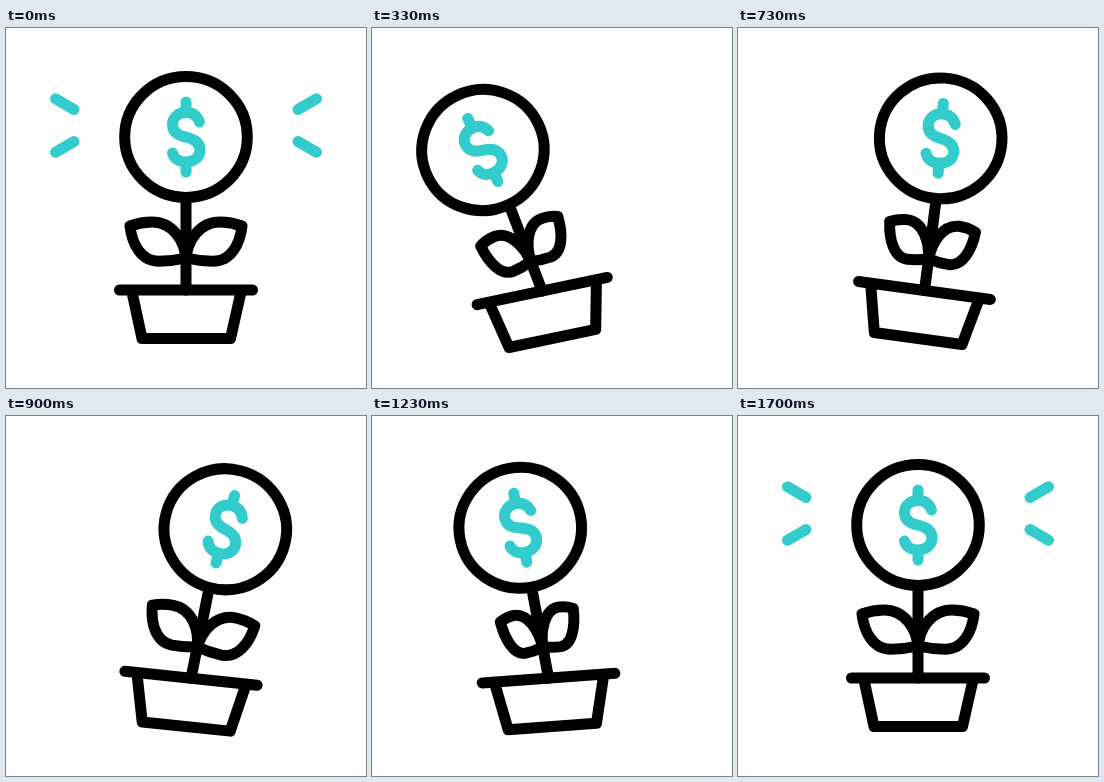
Write an HTML page that moves like this. It is 360 px wide and 360 px high and loops after 2000 ms.

```html
<!DOCTYPE html>
<html lang="en">
<head>
<meta charset="utf-8">
<title>Money plant</title>
<style>
  html, body { margin: 0; width: 100%; height: 100%; overflow: hidden; background: #fff; }
  svg { display: block; width: 100vw; height: 100vh; }
  path, ellipse { fill: none; stroke: #000; stroke-width: 11; stroke-linecap: round; stroke-linejoin: round; }
  .accent { stroke: #33cccc; }
  #leaves path { vector-effect: non-scaling-stroke; }
</style>
</head>
<body>
<svg viewBox="0 0 360 360">
  <defs>
    <path id="leaf" d="M0 0C-1 -20 -14 -38 -34 -38Q-45 -38 -56 -34C-54 -16 -45 1.3 -27 1.3Q-13 1 0 -2"/>
  </defs>
  <path id="rays" class="accent"/>
  <!-- Each part hangs on the one below it and is drawn upright around its own pivot. -->
  <path id="pot" d="M-66.5 -48H66.5M-54 -46L-44 .5H44.5L55 -46"/>
  <g id="stem">
    <path d="M0 0V-92"/>
    <g id="leaves">
      <path d="M0 0C-1 -20 -14 -38 -34 -38Q-45 -38 -56 -34C-54 -16 -45 1.3 -27 1.3Q-13 1 0 -2"/>
      <path transform="scale(-1 1)" d="M0 0C-1 -20 -14 -38 -34 -38Q-45 -38 -56 -34C-54 -16 -45 1.3 -27 1.3Q-13 1 0 -2"/>
    </g>
  </g>
  <g id="head">
    <ellipse cy="-61" rx="61.3" ry="60.4"/>
    <path class="accent" transform="translate(0 -61)" d="M0 -35V-25M0 25V35M13.5 -15C11 -22 6 -24.5 0 -24.5C-8 -24.5 -13.5 -19 -13.5 -12.5C-13.5 -5.5 -8 -1.5 0 .2C8 2 14 6 14 13C14 20 8 25 0 25C-7 25 -12 21.5 -13.5 16"/>
  </g>
</svg>
<script>
const LOOP = 2000, FRAME = 1000 / 30;
const RIM_HEIGHT = 48, STEM_LENGTH = 92, LEAF_HEIGHT = 30;

const [rays, pot, stem, leaves, head] =
  ["rays", "pot", "stem", "leaves", "head"].map(id => document.getElementById(id));

const mix = (a, b, p) => a + (b - a) * p;

// Eases from 0 to 1 between two times.
function ramp(t, from, to) {
  const p = Math.min(1, Math.max(0, (t - from) / (to - from)));
  return p * p * (3 - 2 * p);
}

const pulse = (t, from, peak, to) => ramp(t, from, peak) - ramp(t, peak, to);

// Swings left, right, left, then settles; turns after the first follow a fixed beat.
function swing(t, first, beat, left, right, leftAgain) {
  const turn = n => first + n * beat;
  return -left * pulse(t, 0, first, turn(1))
    + right * pulse(t, first, turn(1), turn(2))
    - leftAgain * pulse(t, turn(1), turn(2), turn(3));
}

// Moves up from a point along a direction tilted from vertical.
function rise({ x, y }, length, deg) {
  const a = deg * Math.PI / 180;
  return { x: x + length * Math.sin(a), y: y - length * Math.cos(a) };
}

function place(part, { x, y }, deg) {
  part.setAttribute("transform", `translate(${x} ${y}) rotate(${deg})`);
}

function rayPath(grow) {
  if (grow < 0.01) return "";
  let d = "";
  for (const side of [-1, 1])
    for (const up of [-1, 1])
      d += `M${180 + side * 112} ${97.5 + up * 16}L${180 + side * mix(112, 130.5, grow)} ${97.5 + up * mix(16, 26.7, grow)}`;
  return d;
}

function render(t) {
  const potTilt = swing(t, 428, 360, 13.5, 9.2, 4.8);
  const stemTilt = swing(t, 480, 345, 27, 14.5, 11.6);
  const headTilt = swing(t, 494, 355, 34, 17, 11);
  const leafWidth = 1 - 0.81 * pulse(t, 200, 550, 832) - 0.42 * pulse(t, 832, 1100, 1570);

  const base = { x: 180, y: 310 };
  const rim = rise(base, RIM_HEIGHT, potTilt);
  place(pot, base, potTilt);
  place(stem, rim, stemTilt);
  place(head, rise(rim, STEM_LENGTH, stemTilt), headTilt);
  leaves.setAttribute("transform", `translate(0 ${-LEAF_HEIGHT}) scale(${leafWidth} 1)`);
  rays.setAttribute("d", rayPath(1 - ramp(t, 0, 267) + ramp(t, 1433, 1700)));
}

function tick() {
  const t = performance.now() % LOOP;
  render(Math.floor((t + 4) / FRAME) * FRAME);
  requestAnimationFrame(tick);
}
tick();
</script>
</body>
</html>
```
